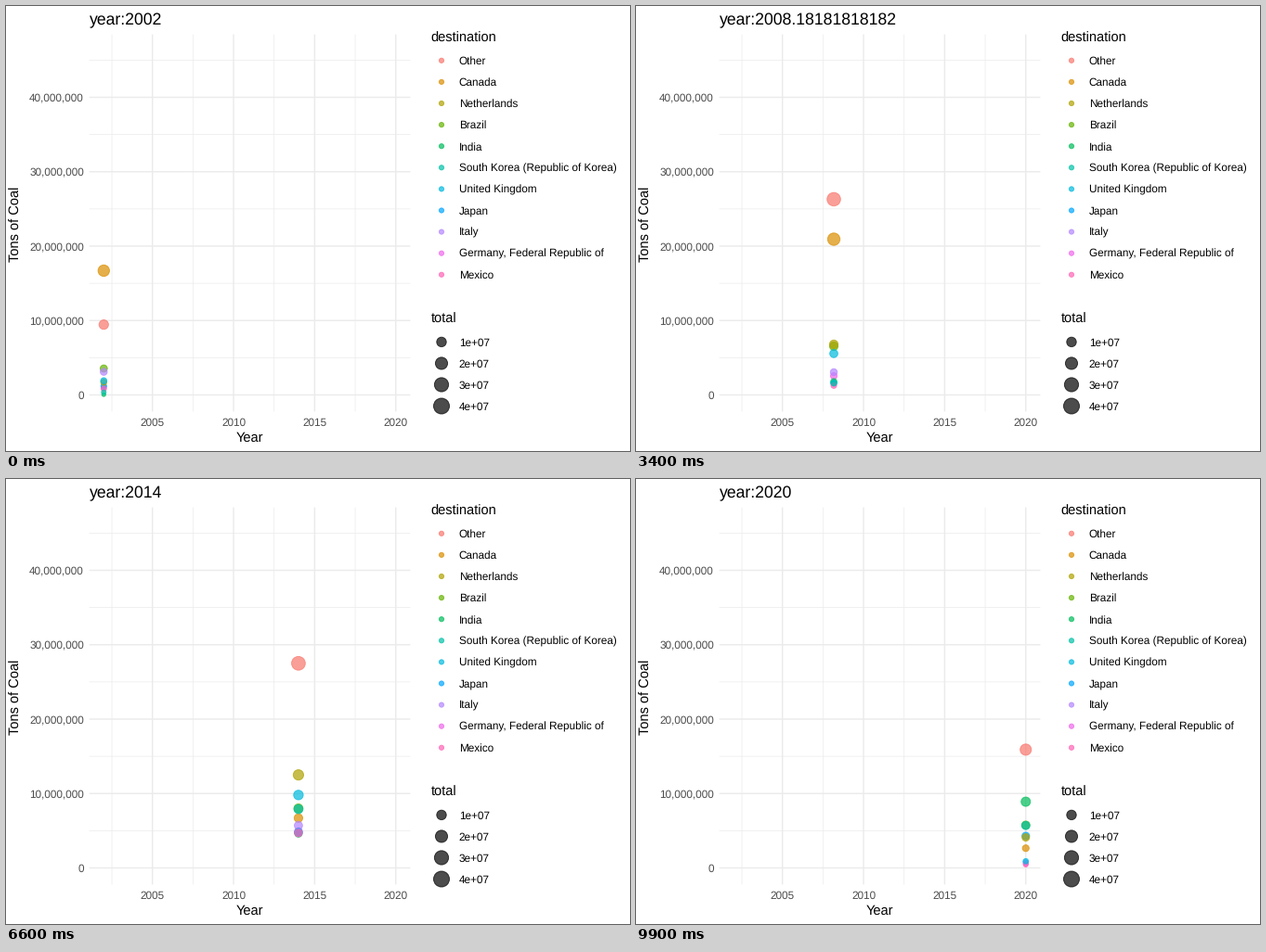
A matplotlib script that plays this animation: 672 px wide and 480 px high, repeating every 10 s.

```python
import numpy as np
import matplotlib.pyplot as plt
from matplotlib.animation import FuncAnimation
from matplotlib.patches import Circle

plt.rcParams["font.family"] = "Liberation Sans"
plt.rcParams["text.hinting"] = "none"

W, H, DPI = 672, 480, 96
FRAMES = 100
PX = 72 / DPI          # one pixel in points
ALPHA = 0.7
LEFT, RIGHT, TOP, BOTTOM = 89.7, 435.4, 30.6, 437.4
MAX = 46.2

COLORS = {
    "Other": "#F8766D",
    "Canada": "#DB8E00",
    "Netherlands": "#AEA200",
    "Brazil": "#64B200",
    "India": "#00BD5C",
    "South Korea (Republic of Korea)": "#00C1A7",
    "United Kingdom": "#00BADE",
    "Japan": "#00A6FF",
    "Italy": "#B385FF",
    "Germany, Federal Republic of": "#EF67EB",
    "Mexico": "#FF63B6",
}

# Millions of tons per year, 2002 to 2020; gaps are interpolated.
na = np.nan
YEARS = np.arange(2002, 2021)
TONS = {
    "Other": [9.45, na, 10.5, 13.1, 12.6, 18, 28, 17.8, 28.8, 38.5,
              MAX, 41, 27.5, 18.4, 14, 31, 38.6, 31.5, 15.9],
    "Canada": [16.7, 20.8, 17.8, 19.5, 19.9, 18.4, 23, 10.6, 11.4, 6.8,
               7.2, na, 6.7, na, 5, na, na, 5.1, 2.65],
    "Netherlands": [1.7, na, na, 2.6, 2.1, 4.6, 7, 5.8, 6.9, 10.8,
                    13.6, na, 12.5, na, 10.15, na, na, 8.7, 4.1],
    "Brazil": [3.55, na, na, 4.2, 4.5, 6.5, 6.4, na, na, 8.7,
               7.95, na, 8, 6.3, 6.9, na, na, 7.2, 5.75],
    "India": [0.05, na, na, 1.4, na, na, 1.7, na, 2.7, 4.5,
              6.8, 4, 4.65, 6.4, 5.5, 11.5, 17.3, na, 8.9],
    "South Korea (Republic of Korea)": [
        0.35, na, 2.6, 1.6, 0.6, na, 1.6, 1.7, 5.7, 10.5,
        9.1, na, 7.9, 6.1, 4.45, 9.5, na, na, 5.7],
    "United Kingdom": [1.9, na, na, 1.8, 2.6, na, 5.75, 4.6, 4.4, 6.9,
                       12.1, 13.5, 9.8, 4.1, 1.05, na, 4.4, 1.8, 0.9],
    "Japan": [1.2, 0, 4.4, 2.1, 0.3, 0, 1.7, 0.9, 3.2, 6.9,
              5.65, na, 4.8, na, 4.6, 7.7, 10, na, 4.3],
    "Italy": [3.1, na, na, 2.5, 3.3, na, 2.95, 3.6, 3.3, 6.8,
              8.3, na, 5.7, na, 1.9, na, 3.9, na, 0.75],
    "Germany, Federal Republic of": [
        1, na, na, 0.7, 1.7, na, 2.1, 4.8, na, na,
        5.1, na, 4.9, na, 3.4, na, 3.9, na, 0.6],
    "Mexico": [0.8, na, na, 1, 0.5, na, na, na, 1.9, na,
               3.45, 5.7, 4.7, na, 3.1, na, 5.2, 4.8, 0.45],
}

# Each year is reached on a whole frame.
KEYS = np.round(1 + (YEARS - 2002) * (FRAMES - 1) / 18) - 1


def tween(values, frame):
    values = np.asarray(values, float)
    known = ~np.isnan(values)
    return np.interp(frame, KEYS[known], values[known])


def year_x(year):
    return 157.7 + (year - 2005) * 17.47


def tons_y(tons):
    return 419.5 - tons * 8.025


def radius(size):
    points = size * 2.845 + 0.945
    return 0.375 * points / PX


def tons_radius(tons):
    return radius(1 + 5 * np.sqrt(max(tons, 0) / MAX))


fig = plt.figure(figsize=(W / DPI, H / DPI), dpi=DPI, facecolor="white")
ax = fig.add_axes([0, 0, 1, 1])
ax.set_xlim(0, W)
ax.set_ylim(H, 0)
ax.axis("off")


def line(xs, ys, width):
    ax.plot(xs, ys, color="#EBEBEB", lw=width * PX, snap=False,
            solid_capstyle="butt", zorder=1)


def text(x, y, s, size, color="black", **kw):
    kw.setdefault("va", "baseline")
    return ax.text(x, y, s, fontsize=size, color=color, **kw)


def dot(x, y, r, color):
    return ax.add_patch(Circle((x, y), r, facecolor=color, edgecolor=color,
                               lw=0.945 * PX, alpha=ALPHA, zorder=3))


# Grid and axes
for year in np.arange(2002.5, 2020, 5):
    line([year_x(year)] * 2, [TOP, BOTTOM], 0.71)
for tons in range(5, 50, 10):
    line([LEFT, RIGHT], [tons_y(tons)] * 2, 0.71)
for year in range(2005, 2021, 5):
    line([year_x(year)] * 2, [TOP, BOTTOM], 1.42)
    text(year_x(year), 453, str(year), 8.8, "#4D4D4D", ha="center")
for tons in range(0, 50, 10):
    line([LEFT, RIGHT], [tons_y(tons)] * 2, 1.42)
    text(84, tons_y(tons) + 4.2, f"{tons * 10**6:,}", 8.8, "#4D4D4D",
         ha="right")
text((LEFT + RIGHT) / 2, 470, "Year", 11, ha="center")
text(18, (TOP + BOTTOM) / 2 + 1, "Tons of Coal", 11, rotation=90,
     ha="right", va="center")
title = text(LEFT, 20, "", 13.2)

# Legends
text(457.3, 39, "destination", 11)
for i, (name, color) in enumerate(COLORS.items()):
    y = 58.8 + 23.1 * i
    dot(469, y, radius(1.5), color)
    text(487.7, y + 4.2, name, 8.8)
text(457.3, 342, "total", 11)
for i in range(4):
    y = 362.4 + 23.04 * i
    dot(469, y, tons_radius(10 * (i + 1)), "black")
    text(487.7, y + 4.2, f"{i + 1}e+07", 8.8)

# Points overlap in alphabetical order
points = {name: dot(0, 0, 1, COLORS[name]) for name in sorted(TONS)}


def draw(frame):
    title.set_text(f"year:{2002 + frame * 18 / (FRAMES - 1):.15g}")
    x = year_x(tween(YEARS, frame))
    for name, point in points.items():
        tons = tween(TONS[name], frame)
        point.set_center((x, tons_y(tons)))
        point.set_radius(tons_radius(tons))
    return [title, *points.values()]


anim = FuncAnimation(fig, draw, frames=FRAMES, interval=100, repeat=True,
                     repeat_delay=0, blit=False)
plt.show()
```
